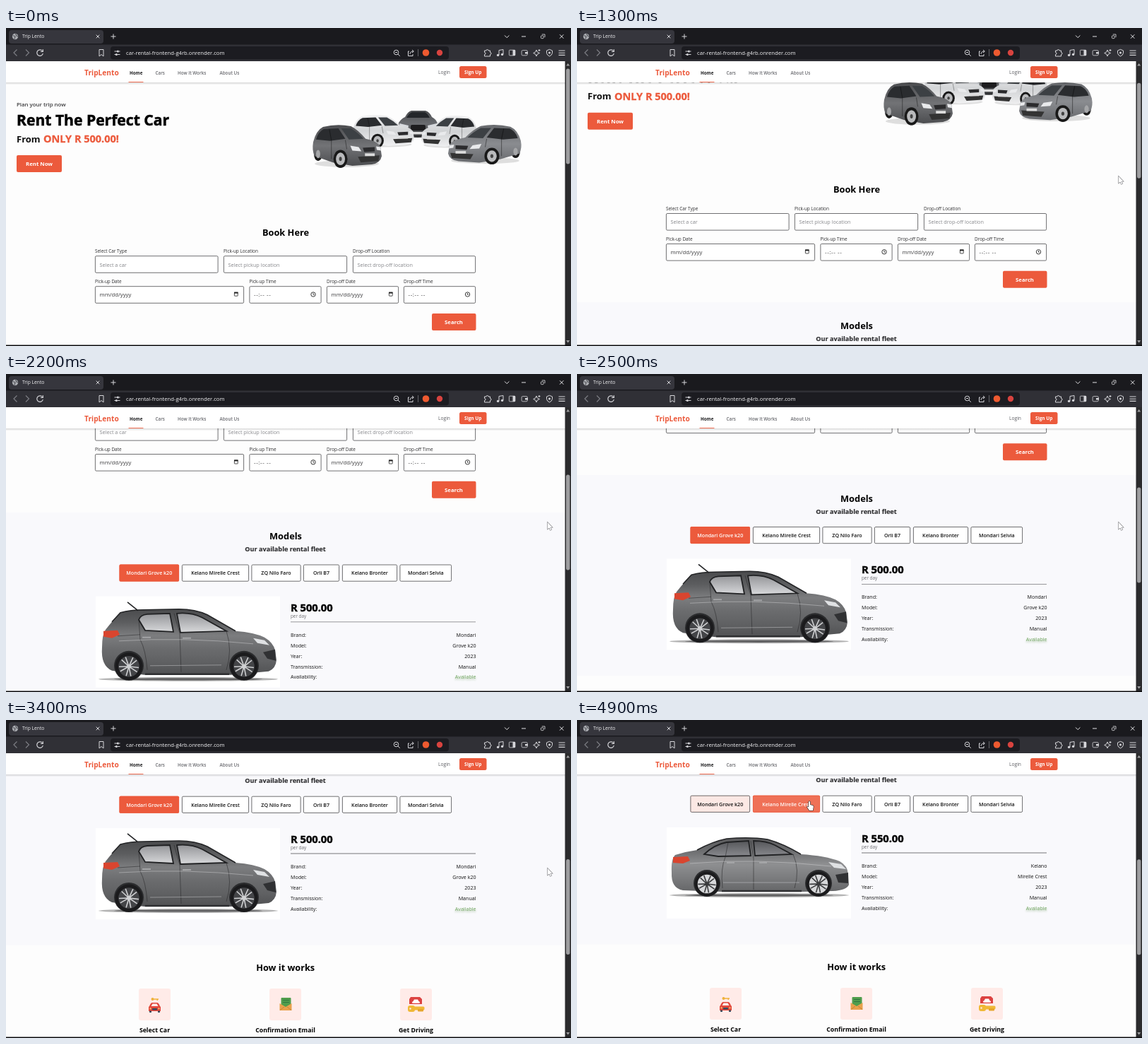
An HTML page with a canvas for the animation above (5 s loop, 800 by 450 pixels).

```html
<!DOCTYPE html>
<html lang="en">
<head>
<meta charset="utf-8">
<title>Trip Lento</title>
<style>
html, body { margin: 0; width: 100%; height: 100%; overflow: hidden; background: #000; }
canvas { display: block; width: 800px; height: 450px; }
</style>
</head>
<body>
<canvas id="stage"></canvas>
<script>
const LOOP = 5000, CLICK = 4750;
const CORAL = '#ec5a3c', INK = '#111', ICON = '#d6d6da';
const FONT = '"Open Sans", "Noto Sans", sans-serif';
const canvas = document.getElementById('stage');
const ctx = canvas.getContext('2d');
const dpr = window.devicePixelRatio || 1;
canvas.width = 800 * dpr;
canvas.height = 450 * dpr;

// ---------- helpers ----------
function rect(x, y, w, h, color, r = 0, border) {
  ctx.beginPath();
  ctx.roundRect(x, y, w, h, r);
  if (color) { ctx.fillStyle = color; ctx.fill(); }
  if (border) {
    ctx.beginPath();
    ctx.roundRect(x + 0.4, y + 0.4, w - 0.8, h - 0.8, r);
    ctx.strokeStyle = border;
    ctx.lineWidth = 0.8;
    ctx.stroke();
  }
}
function disc(x, y, rx, color, ry = rx) {
  ctx.beginPath();
  ctx.ellipse(x, y, rx, ry, 0, 0, 7);
  ctx.fillStyle = color;
  ctx.fill();
}
function shape(d, color) {
  ctx.fillStyle = color;
  ctx.fill(new Path2D(d));
}
function line(d, color = ICON, w = 1) {
  ctx.strokeStyle = color;
  ctx.lineWidth = w;
  ctx.stroke(new Path2D(d));
}
// y is the middle of the capitals
function text(str, x, y, size, color = INK, weight = 400, align = 'left', heavy = 0) {
  ctx.font = `${weight} ${size}px ${FONT}`;
  ctx.textAlign = align;
  ctx.fillStyle = color;
  const base = y + size * 0.36;
  ctx.fillText(str, x, base);
  if (heavy) {
    ctx.strokeStyle = color;
    ctx.lineWidth = heavy;
    ctx.strokeText(str, x, base);
  }
}
function vertical(y0, y1, ...colors) {
  const g = ctx.createLinearGradient(0, y0, 0, y1);
  colors.forEach((c, i) => g.addColorStop(i / (colors.length - 1), c));
  return g;
}
const mix = (a, b, p) => `rgb(${a.map((v, i) => Math.round(v + (b[i] - v) * p))})`;
const clamp = v => Math.min(1, Math.max(0, v));

// Smooth curve through [time, value] keys, at rest on both ends
function track(keys, t) {
  const n = keys.length - 1;
  if (t <= keys[0][0]) return keys[0][1];
  if (t >= keys[n][0]) return keys[n][1];
  const i = keys.findIndex(k => k[0] > t) - 1;
  const slope = j => j <= 0 || j >= n ? 0 :
    (keys[j + 1][1] - keys[j - 1][1]) / (keys[j + 1][0] - keys[j - 1][0]);
  const [t0, a] = keys[i], [t1, b] = keys[i + 1];
  const h = t1 - t0, u = (t - t0) / h, u2 = u * u, u3 = u2 * u;
  return a * (2 * u3 - 3 * u2 + 1) + b * (3 * u2 - 2 * u3)
    + h * slope(i) * (u3 - 2 * u2 + u) + h * slope(i + 1) * (u3 - u2);
}

// ---------- motion ----------
const SCROLL = [[500, 0], [900, 5.5], [1000, 14], [1300, 60], [1700, 145], [2200, 252],
  [2800, 353], [3250, 408], [3400, 414], [3700, 415]];
const ENTER_X = [[150, 806], [700, 767]], ENTER_Y = [[150, 90], [700, 210]];
const LEAVE_X = [[3420, 767], [3680, 650], [4350, 329]];
const LEAVE_Y = [[3420, 210], [3680, 170], [4350, 115]];

// ---------- cars ----------
function angledCar(x, y, w, h, flip, top, low) {
  ctx.save();
  ctx.translate(flip ? x + w : x, y);
  ctx.scale((flip ? -w : w) / 100, h / 64);
  disc(50, 57, 46, 'rgba(0,0,0,.12)', 5);
  disc(9, 43, 6, '#191919', 10);
  shape('M2 26 Q6 9 16 4 Q36 -1 56 3 Q66 8 77 21 Q93 24 98 32 L100 46 Q98 56 86 58 L58 60 L30 55 L4 46 Q0 38 2 26Z',
    vertical(0, 62, top, low, top));
  shape('M6 22 Q9 11 17 7 L38 6 L48 21 L26 24Z', '#2a2c2f');
  shape('M42 6 L56 6 Q66 12 74 21 L53 22Z', '#3c4044');
  line('M25 7 L28 23 L28 50 M48 23 L50 36', 'rgba(0,0,0,.4)', 1);
  shape('M55 31 L67 33 L71 39 L58 38Z', '#e9eaec');
  shape('M92 32 L98 33 L99 38 L93 37Z', '#e9eaec');
  shape('M73 34 L90 33 L90 39 L75 40Z', '#2b2b2d');
  shape('M66 47 L97 45 L95 53 L70 55Z', '#333');
  rect(76, 42, 14, 4, '#dcdcdc');
  disc(41, 50, 10, '#191919', 13);
  disc(41, 50, 6.5, '#b9babc', 9);
  disc(41, 50, 2, '#444', 3);
  disc(9, 43, 3, '#a5a6a8', 6);
  ctx.restore();
}
function frontCar() {
  rect(558, 145, 7, 11, '#161616', 2);
  rect(601, 145, 7, 11, '#161616', 2);
  shape('M556 134 Q560 128 565 126 Q569 118 574 117 L594 117 Q600 119 603 126 Q609 129 611 135 L610 150 Q602 155 583 155 Q563 155 556 150Z',
    vertical(117, 155, '#4b4d50', '#6a6c70', '#2c2d2f'));
  shape('M567 127 Q571 120 575 119 L593 119 Q597 121 600 127Z', '#23262a');
  shape('M557 135 L570 138 L569 143 L558 141Z', '#d7dade');
  shape('M610 135 L597 138 L598 143 L609 141Z', '#d7dade');
  rect(573, 137, 21, 8, '#1d1d1f', 2);
  rect(575, 147, 17, 3.5, '#ddd');
}
function wheel(x, y, r, rim, spoke) {
  disc(x, y, r, '#1b1b1d');
  disc(x, y, r * 0.76, rim);
  for (let i = 0; i < 5; i++) {
    const a = i * Math.PI * 0.4 - 0.9;
    const tip = k => `${x + Math.cos(a + k) * r * 0.72} ${y + Math.sin(a + k) * r * 0.72}`;
    line(`M${tip(-0.24)} L${x} ${y} L${tip(0.24)}`, spoke, 1.6);
  }
  disc(x, y, r * 0.15, spoke);
}
function sideCar(c) {
  ctx.save();
  ctx.translate(0, c.shift);
  disc(258, c.floor, 127, 'rgba(40,40,42,.35)', 3);
  disc(258, c.floor, 105, 'rgba(30,30,32,.55)', 1.6);
  shape(c.body, vertical(c.top, c.floor - 6, ...c.paint));
  line(c.roof, '#242527', 1.6);
  shape(c.glass, vertical(c.top, c.top + 32, ...c.tint));
  line(c.glass, '#202123', 1.8);
  line(c.seams, 'rgba(35,35,37,.65)', 0.8);
  line(c.crease, 'rgba(215,215,217,.45)', 1);
  line(c.sill, '#2e2f31', 2.4);
  shape(c.handles, '#a3a4a6');
  shape(c.tail, '#d9452f');
  shape(c.lamp, '#dfe1e3');
  shape(c.grille, '#303133');
  for (const x of c.wheels) {
    disc(x, c.axle - 1, c.r + 1.5, '#2b2c2e');
    wheel(x, c.axle, c.r, c.rim, c.spoke);
  }
  ctx.restore();
}
const HATCH = {
  shift: 353, top: 232, floor: 331, axle: 313, r: 19.5, wheels: [174, 337],
  rim: '#444548', spoke: '#cfd0d2',
  paint: ['#4a4b4d', '#5c5d5f', '#7c7d7f', '#6b6c6e', '#606163', '#505153'],
  tint: ['#85868a', '#d6d7d9'],
  body: 'M136 286 Q136 268 141 261 Q152 247 162 237 Q175 233 195 233 L245 232 Q268 232 285 240 L325 263 Q352 265 366 272 Q378 279 381 290 L383 304 Q382 316 372 320 L318 325 L196 325 L150 319 Q134 312 136 286Z',
  roof: 'M172 222 L187 234 M150 250 L162 237 Q176 233 195 233 L245 232 Q268 232 285 240 L325 263',
  glass: 'M188 247 Q190 240 200 239 L232 238 L237 264 L197 262Z M242 238 Q262 236 278 244 L312 263 L247 265Z',
  seams: 'M238 238 L246 266 L248 321 M188 247 L190 275 Q198 290 200 318 M312 263 Q321 290 312 318 M158 270 L190 268',
  crease: 'M160 277 Q250 271 350 281 M204 312 L305 311',
  sill: 'M197 324 L316 324',
  handles: 'M193 271 h12 v2 h-12Z M250 272 h12 v2 h-12Z',
  tail: 'M138 263 L158 262 L161 268 L150 273 L138 271Z',
  lamp: 'M350 273 L366 276 L373 283 L356 280Z',
  grille: 'M364 293 L381 289 L382 305 L370 302Z'
};
const SEDAN = {
  shift: 415, top: 166, floor: 248, axle: 232, r: 17.5, wheels: [184, 342],
  rim: '#d6d7d9', spoke: '#3a3b3d',
  paint: ['#59595b', '#6c6d6f', '#8e8f91', '#7b7c7e', '#666769'],
  tint: ['#4a4b4e', '#94959a'],
  body: 'M134 216 Q133 197 139 191 Q155 186 170 184 Q192 172 212 168 Q245 165 270 169 Q292 175 317 190 Q352 192 372 200 Q383 206 384 218 L385 233 Q382 241 362 242 L320 243 L204 243 L150 241 Q133 238 134 216Z',
  roof: 'M170 184 Q192 172 212 168 Q245 165 270 169 Q292 175 317 190',
  glass: 'M180 190 Q195 176 212 173 L243 171 L246 192 L200 193Z M250 171 Q268 171 280 177 L304 190 L252 192Z',
  seams: 'M246 171 L250 196 L250 240 M214 173 L210 194 Q203 210 206 238 M306 190 Q316 212 308 238',
  crease: 'M160 203 Q250 195 360 207 M207 230 L315 230',
  sill: 'M205 242 L318 242',
  handles: 'M212 201 h11 v2 h-11Z M258 201 h11 v2 h-11Z',
  tail: 'M136 194 L157 193 L160 199 L150 203 L136 202Z',
  lamp: 'M356 201 L374 204 L381 211 L364 209Z',
  grille: 'M366 219 L384 216 L384 231 L370 230Z'
};

// ---------- page ----------
const TABS = [[160.5, 84.5, 'Mondari Grove k20'], [249, 95, 'Kelano Mirelle Crest'], [347.5, 70, 'ZQ Nilo Faro'],
  [421, 51, 'Orli B7'], [476, 78, 'Kelano Bronter'], [557.5, 73.5, 'Mondari Selvia']];
const OFFERS = [
  { price: 'R 500.00', brand: 'Mondari', model: 'Grove k20', car: HATCH },
  { price: 'R 550.00', brand: 'Kelano', model: 'Mirelle Crest', car: SEDAN }
];

function hero() {
  text('Plan your trip now', 15, 108, 7.85, '#3c3c3e', 600);
  text('Rent The Perfect Car', 15, 130, 21.1, '#000', 700, 'left', 0.5);
  text('From', 15, 157, 13, INK, 700);
  text('ONLY R 500.00!', 53, 157, 14.5, CORAL, 700, 'left', 0.3);
  rect(15, 180, 64, 24, CORAL, 2);
  text('Rent Now', 47, 192, 7.8, '#fff', 700, 'center');
  frontCar();
  angledCar(490, 122, 88, 48, false, '#f3f3f4', '#d3d5d7');
  angledCar(588, 123, 80, 48, true, '#f1f1f2', '#d0d2d4');
  angledCar(433, 136, 99, 63, false, '#4a4b4e', '#727376');
  angledCar(626, 136, 105, 58, true, '#66686c', '#8a8c90');
}
function field(x, w, y, label, hint) {
  text(label, x, y, 6.4, '#2b2b2d');
  rect(x, y + 6.3, w, 24.4, '#fff', 1.5, '#4c4c4e');
  if (hint) text(hint, x + 6.5, y + 19, 7.25, '#85868a');
}
function dateField(x, w, label) {
  field(x, w, 359, label);
  text('mm/dd/yyyy', x + 6.5, 377.3, 7.7, '#39393b');
  const r = x + w - 14;
  rect(r, 374, 5.6, 5.6, null, 0.5, '#222');
  rect(r, 373.6, 5.6, 2, '#222');
}
function timeField(x, w, label) {
  field(x, w, 359, label);
  ctx.letterSpacing = '0.6px';
  text('--:-- --', x + 6.5, 377.3, 8, '#39393b');
  ctx.letterSpacing = '0px';
  const r = x + w - 11.5;
  ctx.beginPath();
  ctx.arc(r, 377, 3.2, 0, 7);
  ctx.strokeStyle = '#222';
  ctx.lineWidth = 0.9;
  ctx.stroke();
  line(`M${r} 375 V377.3 H${r + 1.6}`, '#222', 0.8);
}
function booking() {
  text('Book Here', 396, 289, 12.8, '#000', 700, 'center');
  field(126, 174.5, 316, 'Select Car Type', 'Select a car');
  field(308, 175, 316, 'Pick-up Location', 'Select pickup location');
  field(491, 174, 316, 'Drop-off Location', 'Select drop-off location');
  dateField(126, 211, 'Pick-up Date');
  timeField(344.5, 102, 'Pick-up Time');
  dateField(454, 102, 'Drop-off Date');
  timeField(563, 102, 'Drop-off Time');
  rect(603, 404, 62.5, 24, CORAL, 2);
  text('Search', 634, 416, 7.7, '#fff', 700, 'center');
}
function models(t) {
  rect(0, 448.5, 792, 284, '#f9f9fc');
  text('Models', 396, 482, 12.8, '#000', 700, 'center');
  text('Our available rental fleet', 395.5, 500.2, 9.15, '#2f2f31', 700, 'center', 0.15);

  const chosen = t < CLICK ? 0 : 1;
  const fade = 1 - Math.pow(1 - clamp((t - CLICK) / 300), 2.8);
  TABS.forEach(([x, w, name], i) => {
    const glow = i === 0 ? 1 - fade : i === 1 ? fade : 0, on = i === chosen;
    rect(x, 521.8, w, 24, mix([255, 255, 255], [236, 90, 60], glow), 1.5, on ? CORAL : '#4a4a4c');
    text(name, x + w / 2, 534, 7.1, on ? '#fff' : INK, 600, 'center');
  });

  const offer = OFFERS[chosen];
  rect(127, 567, 261, 129, '#fff');
  sideCar(offer.car);
  text(offer.price, 403, 582.5, 14.7, '#000', 700, 'left', 0.45);
  text('per day', 403, 594.8, 6.3, '#6c6c70');
  rect(403, 602.6, 262, 0.8, '#77777a');
  const rows = [['Brand:', offer.brand], ['Model:', offer.model], ['Year:', '2023'],
    ['Transmission:', 'Manual'], ['Availability:', 'Available']];
  rows.forEach(([label, value], i) => {
    const y = 621.5 + i * 14.9, free = i === 4;
    text(label, 403, y, 7.1, INK, 500);
    ctx.save();
    if (free) {
      ctx.shadowColor = 'rgba(60,120,40,.45)';
      ctx.shadowBlur = 3 * dpr;
      ctx.shadowOffsetY = 2 * dpr;
    }
    text(value, 665.5, y, 7.1, free ? '#74a864' : INK, free ? 400 : 500, 'right');
    ctx.restore();
  });
}
function carBadge() {
  disc(207.5, 809, 2, '#f0b23c');
  rect(207, 808.3, 9, 1.5, '#f0b23c');
  rect(213.5, 809, 1.5, 2, '#f0b23c');
  shape('M203 819 Q205 814 207 814 H214 Q216 814 218 819 L219 820 V826 H202 V820Z', '#e2483d');
  shape('M205.500 819 L207.500 815.500 H213.500 L215.500 819Z', '#ffebe8');
  rect(203, 825.5, 3, 2.5, '#37485a', 0.7);
  rect(215, 825.5, 3, 2.5, '#37485a', 0.7);
  rect(207, 822, 7, 2.5, '#37485a', 0.7);
  disc(204.5, 822.3, 1.1, '#f7d774');
  disc(216.5, 822.3, 1.1, '#f7d774');
}
function mailBadge() {
  rect(389.5, 807, 14, 13, '#4f9d4c', 1);
  line('M392 810.500 H401 M392 813.500 H401', '#2f7540', 1);
  shape('M387.500 815 L396 820 L404.500 815 V825 H387.500Z', '#e8a14c');
  line('M388 824.500 L394 820 M404 824.500 L398 820', '#c07c30', 0.8);
}
function driveBadge() {
  shape('M573 806 H586 L589 809 V816 H571 V809Z', '#dc4240');
  shape('M576 813 L578 809.500 H583 L585 813Z', '#fff');
  rect(575, 812.5, 11, 2.3, '#fff', 1);
  rect(569, 818, 10, 9, '#f0b836', 3);
  rect(576, 819.5, 16.5, 5, '#f0b836', 1.5);
  rect(583, 823, 8, 3.5, '#e5a52c', 1);
  disc(572.5, 822.5, 1.2, '#ffebe8');
}
function steps() {
  text('How it works', 395.7, 764, 12.7, '#000', 700, 'center');
  ['Select Car', 'Confirmation Email', 'Get Driving'].forEach((name, i) => {
    const x = 188 + i * 185;
    rect(x, 794, 45, 45, '#ffebe8', 3);
    text(name, x + 22.5, 853, 8.75, '#000', 700, 'center');
  });
  carBadge();
  mailBadge();
  driveBadge();
}
function header() {
  rect(0, 77, 792, 3.5, vertical(77, 80.5, 'rgba(0,0,0,.15)', 'rgba(0,0,0,0)'));
  rect(0, 47, 792, 30, '#fff');
  text('TripLento', 111, 63, 10.2, CORAL, 700);
  text('Home', 175, 63.3, 6.2, '#1d1d1f', 700);
  rect(173.5, 76, 21, 0.9, CORAL);
  text('Cars', 211.5, 63.3, 6.3, '#68696e', 600);
  text('How It Works', 243, 63.3, 6.3, '#68696e', 600);
  text('About Us', 302.5, 63.3, 6.3, '#68696e', 600);
  text('Login', 612, 62.5, 6.7, '#5c5d62');
  rect(642, 54, 38.5, 17, CORAL, 2.5);
  text('Sign Up', 661.2, 62.7, 6.5, '#fff', 700, 'center');
}

// ---------- browser ----------
function browser(scroll) {
  rect(0, 0, 800, 25, '#1a1a1e');
  rect(0, 23.5, 800, 23.5, '#303036');
  rect(4, 3, 134, 19, '#36363d', 4);
  disc(13, 12, 4.2, '#a9abb0');
  line('M9.500 10.500 L13 12 L12 15.500 M13.500 8 L15 11 L17 12', '#55565c', 1.2);
  text('Trip Lento', 23, 12, 6.7, '#f2f2f4', 500);
  line('M127.700 9.700 l4.600 4.600 m0 -4.600 l-4.600 4.600 M148.500 12 h7 m-3.500 -3.500 v7');
  line('M706 10.500 l3.200 3.200 l3.200 -3.200 M730 12 h6 M784 9.300 l5.400 5.400 m0 -5.400 l-5.400 5.400', '#e2e2e5');
  rect(757, 10.5, 4.6, 4.6, null, 1, '#e2e2e5');
  line('M758.800 9 H763 V13.200', '#e2e2e5', 0.8);

  line('M15.500 30.500 L11 35 L15.500 39.500 M28 30.500 L32.500 35 L28 39.500', '#7c7d83', 1.2);
  line('M51.500 32.500 A4.300 4.300 0 1 0 52.300 36 M52.300 30.300 V33.500 H49', ICON, 1.2);
  line('M132 30.500 H138 V40 L135 37.500 L132 40Z');
  rect(148, 26, 479, 18.5, '#1c1c21', 4);
  line('M153.500 33 h3.500 m3 0 h1.500 M153.500 37.500 h1.500 m3 0 h3.500');
  disc(158.4, 33, 1.5, ICON);
  disc(156.4, 37.5, 1.5, ICON);
  text('car-rental-frontend-g4rb.onrender.com', 170, 35.3, 7.65, '#f4f4f6', 500);
  line('M555.800 34.500 a3.300 3.300 0 1 0 -6.600 0 a3.300 3.300 0 1 0 6.600 0 M555 37 l2.800 2.800 M551 34.500 h3');
  line('M571 33 H569.500 V39.500 H576 V37 M572 37 Q572 33 577 33 M575 31 L577.300 33 L575 35');
  rect(583, 30, 0.8, 10, '#77777c');
  disc(594.5, 35, 4.8, '#ee5a30');
  disc(614, 35, 4.2, '#d8433f');

  line('M677.500 32 h2.500 a1.500 1.500 0 0 1 3 0 h2.500 v2.500 a1.500 1.500 0 0 1 0 3 v2.500 h-8 v-2.500 a1.500 1.500 0 0 0 0 -3Z');
  line('M698 38 V31.500 L704 30.500 V37');
  disc(696.6, 38.4, 1.7, ICON);
  disc(702.6, 37.4, 1.7, ICON);
  rect(712, 30.8, 9.3, 8.5, null, 1, ICON);
  rect(717.5, 31, 3.5, 8, ICON);
  rect(729.7, 31.2, 9, 8, null, 1.5, ICON);
  rect(735, 34, 4, 2.5, ICON);
  line('M751 31 L752.300 34 L755.500 35.500 L752.300 37 L751 40 L749.700 37 L746.700 35.500 L749.700 34Z M755 30 v3 m-1.500 -1.500 h3');
  line('M769.500 30.300 L773.500 32 V35.500 Q773 38.500 769.500 40 Q766 38.500 765.500 35.500 V32Z');
  disc(769.5, 35, 1.5, ICON);
  line('M782.500 32 h9 m-9 3.200 h9 m-9 3.200 h9', ICON, 1.1);

  rect(791.5, 47, 8.5, 403, '#2b2b2d');
  shape('M793.200 53.500 L795.700 50 L798.200 53.500Z M793.200 442 L795.700 445.500 L798.200 442Z', '#a0a0a2');
  rect(793, 57.5 + scroll * 0.337, 5.4, 135, '#9d9d9f', 2.7);
  rect(0, 448.6, 800, 1.4, '#0c0c0e');
}
function pointer(t) {
  if (t < ENTER_X[0][0]) return;
  const late = t > 3400;
  const x = track(late ? LEAVE_X : ENTER_X, t), y = track(late ? LEAVE_Y : ENTER_Y, t);
  const hand = x < 631 && y > 107 && y < 131;
  const d = hand
    ? 'M-1 1 Q0 -1 1.200 1 V5 L5 6 Q6 6.500 5.800 8 L5 13 H0 L-3 8.500 Q-3.300 6.800 -1 8Z'
    : 'M0 0 V9.500 L2.200 7.500 L3.700 11 L5.200 10.300 L3.700 7 H6.500Z';
  ctx.save();
  ctx.translate(x, y);
  line(d, hand ? '#222' : '#77777b', 1.2);
  shape(d, '#fff');
  ctx.restore();
}

function draw(now) {
  const t = now % LOOP;
  const scroll = track(SCROLL, t);
  ctx.setTransform(dpr, 0, 0, dpr, 0, 0);
  rect(0, 0, 800, 450, '#fdfdfd');
  ctx.save();
  ctx.translate(0, -scroll);
  hero();
  booking();
  models(t);
  steps();
  ctx.restore();
  header();
  browser(scroll);
  pointer(t);
}
const start = performance.now();
function tick() {
  draw(performance.now() - start);
  requestAnimationFrame(tick);
}
tick();
</script>
</body>
</html>
```
